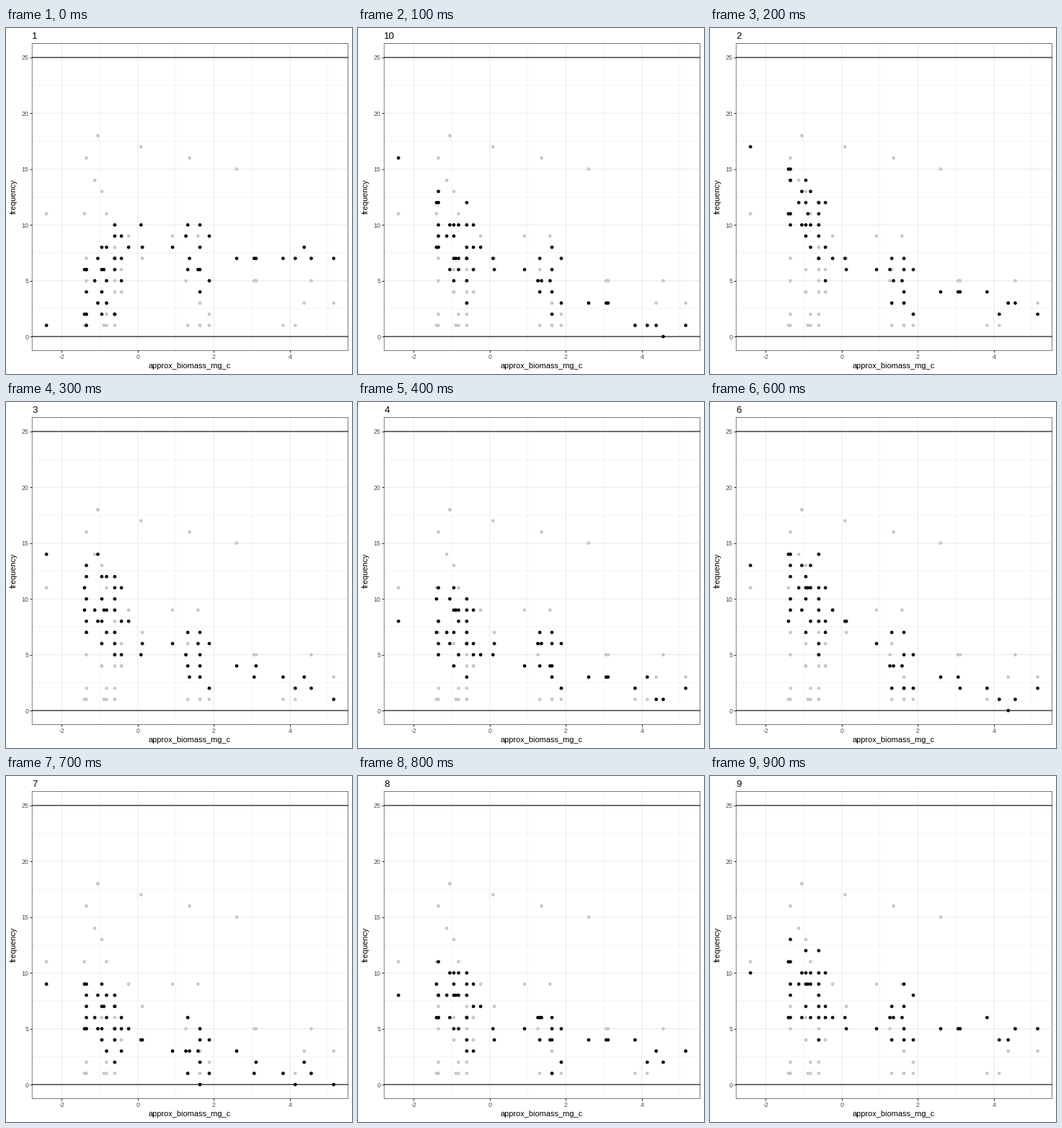
A matplotlib script for the animation above (1000 ms loop, 480 px wide and 480 px high).

```python
import numpy as np
import matplotlib.pyplot as plt
from matplotlib.animation import FuncAnimation

SIZE, DPI = 480, 72
LEFT, RIGHT, TOP, BOTTOM = 36.2, 474.5, 21.55, 447.4   # panel edges in px

plt.rcParams.update({
    "font.family": "Liberation Sans",
    "axes.unicode_minus": False,
    "axes.axisbelow": True,
})

# Observed counts of the species sharing each biomass value
OBSERVED = {
    -2.4: [11], -1.4: [11, 1], -1.35: [16, 7, 5, 2, 1], -1.13: [14],
    -1.05: [18, 18], -0.945: [13, 6, 4, 4], -0.89: [1], -0.82: [11, 2, 1],
    -0.605: [8, 7, 6, 5, 4, 2, 1], -0.43: [6, 4, 4], -0.24: [9],
    0.085: [17], 0.12: [7], 0.915: [9], 1.265: [5], 1.315: [6, 1],
    1.36: [16], 1.585: [9], 1.635: [3, 3, 1, 1], 1.88: [2, 1], 2.6: [15],
    3.06: [5], 3.11: [5], 3.82: [1], 4.14: [1], 4.375: [3], 4.56: [5],
    5.15: [3],
}
X = np.repeat(list(OBSERVED), [len(c) for c in OBSERVED.values()])

# Mean simulated count at a few biomass values, per run
KNOTS = [-2.4, -1, 0.1, 1.5, 4.5]
TRENDS = {
    1: [1, 5, 8.5, 7.5, 7],
    2: [17, 11.5, 6, 5, 2.5],
    4: [8, 8, 5.5, 5, 1.5],
    6: [12, 10.5, 7.5, 4, 1],
    7: [9, 6.5, 4.5, 3, 0.5],
    9: [10, 9, 6, 6, 5],
    10: [17, 8, 7.5, 5, 0.5],
}


def trend(run):
    if run in TRENDS:
        return TRENDS[run]
    return np.mean([TRENDS[run - 1], TRENDS[run + 1]], axis=0)


def simulate(run):
    """Scatter whole counts around the run's trend, fanned out per biomass."""
    rng = np.random.default_rng(run)
    counts = []
    for x, group in OBSERVED.items():
        n = len(group)
        fan = 1.3 * np.sqrt(n) * np.linspace(1, -1, n) if n > 1 else 0
        noise = rng.normal(0, 0.6, n)
        counts.extend(np.interp(x, KNOTS, trend(run)) + fan + noise)
    return np.rint(np.maximum(counts, 0))


# Runs play in alphabetical order of their labels
LABELS = sorted(str(run) for run in range(1, 11))
OFFSETS = [np.column_stack([X, simulate(int(name))]) for name in LABELS]

fig = plt.figure(figsize=(SIZE / DPI, SIZE / DPI), dpi=DPI, facecolor="white")
ax = fig.add_axes([LEFT / SIZE, 1 - BOTTOM / SIZE,
                   (RIGHT - LEFT) / SIZE, (BOTTOM - TOP) / SIZE])
ax.set_xlim(-2.7775, 5.5275)
ax.set_ylim(-1.25, 26.25)
ax.set_xticks([-2, 0, 2, 4])
ax.set_xticks([-1, 1, 3, 5], minor=True)
ax.set_yticks(range(0, 26, 5))
ax.set_yticks(np.arange(2.5, 25, 5), minor=True)
ax.tick_params(which="major", length=2.75, width=1.07, pad=2.2,
               color="#333333", labelcolor="#4d4d4d", labelsize=8.8)
ax.tick_params(which="minor", length=0)
for which, width in (("major", 1.07), ("minor", 0.53)):
    ax.grid(which=which, color="#ebebeb", lw=width, snap=False)
for spine in ax.spines.values():
    spine.set(color="#333333", linewidth=0.65, snap=False)
for level in (0, 25):
    ax.axhline(level, color="black", lw=1.07, zorder=2, snap=False)


def label(x, y, text, size, **style):
    return fig.text(x / SIZE, 1 - y / SIZE, text, fontsize=size,
                    va="baseline", rotation_mode="anchor", **style)


def dots(offsets, color, zorder):
    # One size per dot keeps sub-pixel positions
    return ax.scatter(*offsets.T, s=np.full(len(offsets), 4.7 ** 2), c=color,
                      linewidths=0, zorder=zorder)


label(254.7, 472, "approx_biomass_mg_c", 11, ha="center")
label(14, 234, "frequency", 11, ha="center", rotation=90)
title = label(LEFT, 15.4, "", 13.2, ha="left")
dots(np.column_stack([X, np.concatenate(list(OBSERVED.values()))]), "#c8c8c8", 3)
simulated = dots(OFFSETS[0], "black", 4)


def update(i):
    title.set_text(LABELS[i])
    simulated.set_offsets(OFFSETS[i])
    return title, simulated


anim = FuncAnimation(fig, update, frames=len(LABELS), interval=100, repeat=True)
plt.show()
```
